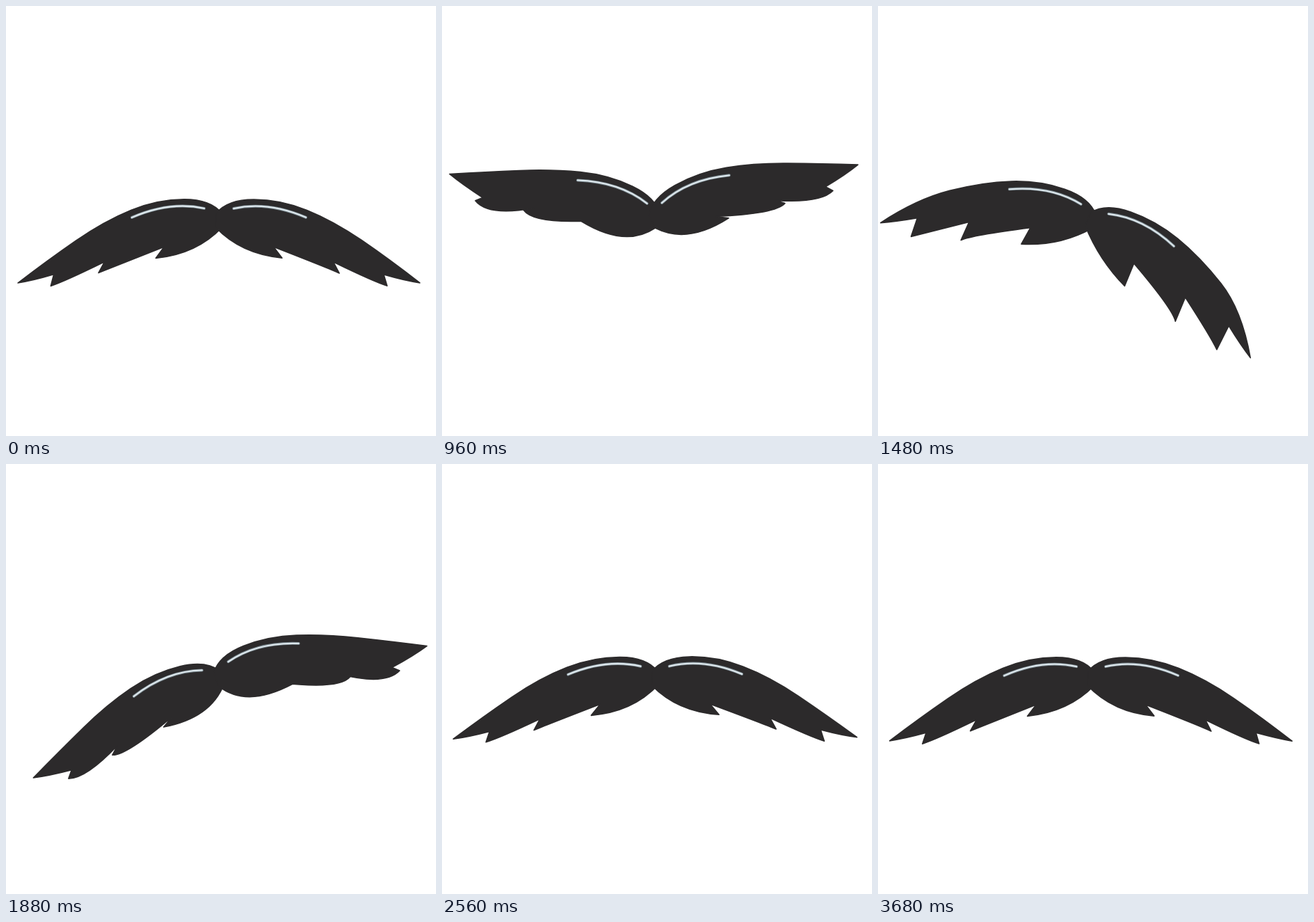
Write an HTML page with a canvas that moves like this. It is 618x618 px and loops after 3.84 s.

```html
<!DOCTYPE html>
<html lang="en">
<head>
<meta charset="utf-8">
<title>Flapping moustache</title>
<style>
  html, body { margin: 0; width: 100%; height: 100%; overflow: hidden; background: #fff; }
  canvas { display: block; }
</style>
</head>
<body>
<canvas id="stage" width="618" height="618"></canvas>
<script>
const ctx = document.getElementById('stage').getContext('2d');
const LOOP = 3840, STEP = 40, BOIL = 160, LAG = 120, FLICK = 25;

// Turning points of a flap: time (ms), rotation (degrees, down is positive)
const SWINGS = [
  [425, 0], [560, 11], [865, -29.5], [1235, 27],
  [1620, -30], [2045, 27], [2400, -1], [2720, 0]
];

// Points: x, y from the root, then how far flick and bulge move them
const TOP = [[12, -30], [88, -30], [165, 1, 0, .15], [246, 57, .17, .47]];
const TIP = [289, 90, 1];
const TEETH = [242, 173, 91];
const SHINE = [[21, -17], [70, -28], [125, -4]];

const easeInOut = u => u < .5 ? 4 * u ** 3 : 1 - 4 * (1 - u) ** 3;

// Feathers trail behind each stroke and overshoot at its end
function pose(t) {
  const i = SWINGS.findIndex(s => s[0] > t);
  if (i < 1) return { turn: 0, flick: 0 };
  const [t0, a] = SWINGS[i - 1], [t1, b] = SWINGS[i];
  const u = (t - t0) / (t1 - t0);
  const power = Math.min(1, Math.abs(b - a) / 40) ** 2;
  return {
    turn: (a + (b - a) * easeInOut(u)) * Math.PI / 180,
    flick: Math.sign(a - b) * FLICK * power * Math.tanh(1.6 * Math.cos(Math.PI * (u - .25)))
  };
}

function wobble(seed) {
  const n = Math.sin(seed * 12.9898) * 43758.5453;
  return (n - Math.floor(n) - .5) * .7;
}

function drawWing(t, side, boil) {
  const { turn, flick } = pose(t);
  let seed = boil * 61 + side * 17;

  const place = ([x, y, w = 0, c = 0]) => {
    const r = Math.hypot(x, y);
    const a = Math.atan2(y, x) + turn + (w * flick - c * Math.abs(flick)) / r;
    return [r * Math.cos(a) + wobble(++seed), r * Math.sin(a) + wobble(++seed)];
  };
  const line = p => ctx.lineTo(...place(p));
  const curve = (bend, end) => ctx.quadraticCurveTo(...place(bend), ...place(end));

  ctx.save();
  ctx.translate(306, 308);
  ctx.scale(side, 1);
  ctx.lineCap = ctx.lineJoin = 'round';

  ctx.beginPath();
  ctx.moveTo(...place([-4, -10]));
  const top = TOP.map(place), tip = place(TIP);
  top.forEach(([x, y], i) => {
    const next = top[i + 1];
    const end = next ? [(x + next[0]) / 2, (y + next[1]) / 2] : tip;
    ctx.quadraticCurveTo(x, y, ...end);
  });

  let belly = [268, 87, .6];
  for (const x of TEETH) {
    const y = 30 + x * .265;
    curve(belly, [x * 1.05 - 17, y - 16]);
    line([x, y, .7, -.35]);
    belly = [x * .92, y - 6, .05, -.55];
  }
  curve([32, 49, -.22, -.33], [-5, 10]);
  ctx.closePath();
  ctx.fillStyle = ctx.strokeStyle = '#2c2a2b';
  ctx.lineWidth = 1.6;
  ctx.fill();
  ctx.stroke();

  ctx.beginPath();
  ctx.moveTo(...place(SHINE[0]));
  curve(SHINE[1], SHINE[2]);
  for (const [color, width] of [['#75838a', 4], ['#dce6eb', 2.3]]) {
    ctx.strokeStyle = color;
    ctx.lineWidth = width;
    ctx.stroke();
  }
  ctx.restore();
}

function draw(now) {
  const t = Math.floor(now % LOOP / STEP) * STEP;
  const boil = Math.floor(t / BOIL);
  ctx.fillStyle = '#fff';
  ctx.fillRect(0, 0, 618, 618);
  drawWing(t, -1, boil);
  drawWing(t - LAG, 1, boil);
}

let start;
function tick(now) {
  start ??= now;
  draw(now - start);
  requestAnimationFrame(tick);
}
draw(0);
requestAnimationFrame(tick);
</script>
</body>
</html>
```
